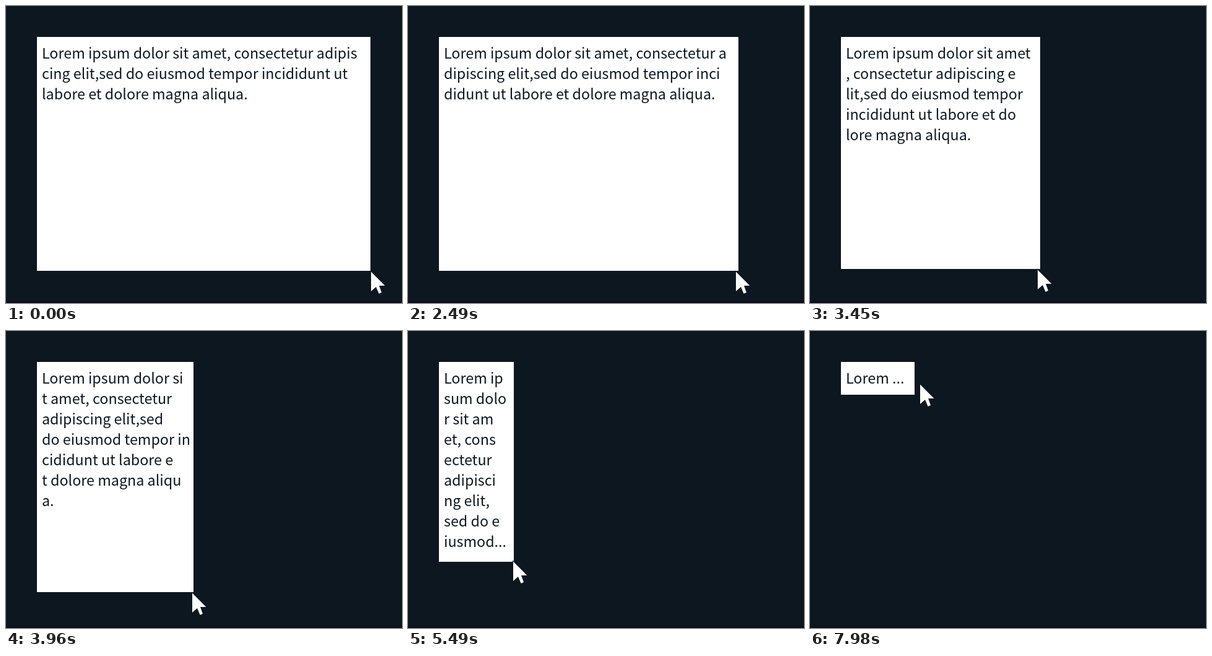
Write an HTML page that moves like this. It is 640 by 480 pixels and loops after 8000 ms.

```html
<!DOCTYPE html>
<html lang="en">
<head>
<meta charset="utf-8">
<title>Resizable text box</title>
<style>
  html, body { margin: 0; width: 100%; height: 100%; overflow: hidden; background: #0d1720; }
  svg { position: absolute; left: 0; top: 0; display: block; }
  text {
    font: 23.3px "Noto Sans CJK JP", "Noto Sans", sans-serif;
    fill: #0d1720; white-space: pre;
  }
</style>
</head>
<body>
<svg width="640" height="480" viewBox="0 0 640 480">
  <rect y="477" width="640" height="3" fill="#0d0e1b"/>
  <rect id="box" x="50" y="50" fill="#fff"/>
  <g id="lines"></g>
  <path id="cursor" d="M0 -.4L22.4 22H13L17 33L12.7 35L8 24L0 31Z"
    fill="#fff" stroke="#0d1720" stroke-width="2" paint-order="stroke"/>
</svg>
<script>
const LOOP = 8000, STEP = 30;
const LEFT = 50, TOP = 50, MIN = 53;
const CHAR = 11.2, LINE = 33;
const TEXT = "Lorem ipsum dolor sit amet, consectetur adipiscing elit,sed do " +
  "eiusmod tempor incididunt ut labore et dolore magna aliqua.";

// Key points of the pointer: time, x, y
const PATH = [
  [0, 590, 430], [2080, 590, 430], [2430, 540, 430], [2940, 448, 429],
  [3960, 301, 424], [4770, 228, 415], [5670, 161, 356], [6360, 144, 235],
  [7290, 101, 99], [7530, 84, 86], [7680, 84, 86], [7980, 178, 87], [8100, 200, 88]
];

const box = document.getElementById("box");
const lines = document.getElementById("lines");
const cursor = document.getElementById("cursor");
let shown = "";

function slope(i, k) {
  const a = PATH[i], b = PATH[i + 1];
  return a && b ? (b[k] - a[k]) / (b[0] - a[0]) : 0;
}

// Monotone tangent: harmonic mean of the neighbouring slopes
function tangent(i, k) {
  const a = slope(i - 1, k), b = slope(i, k);
  return a * b > 0 ? 2 * a * b / (a + b) : 0;
}

function pointer(t) {
  const i = PATH.findIndex(p => p[0] > t) - 1;
  const a = PATH[i], b = PATH[i + 1], d = b[0] - a[0];
  const u = (t - a[0]) / d, v = 1 - u;
  return [1, 2].map(k => Math.round(
    a[k] * (1 + 2 * u) * v * v + b[k] * u * u * (3 - 2 * u) +
    d * u * v * (tangent(i, k) * v - tangent(i + 1, k) * u)));
}

function wrap(w, h) {
  const cols = Math.max(Math.floor(w / CHAR) - 2, 2);
  const rows = Math.max(Math.floor((h - 20) / LINE), 1);
  const out = [];
  for (let i = 0; i < TEXT.length; i += cols) out.push(TEXT.slice(i, i + cols));
  if (out.length > rows) {
    out.length = rows;
    out[rows - 1] = out[rows - 1].slice(0, cols - 2) + "...";
  }
  return out;
}

function setLines(list) {
  const key = list.join("\n");
  if (key === shown) return;
  shown = key;
  lines.replaceChildren(...list.map((s, i) => {
    const el = document.createElementNS("http://www.w3.org/2000/svg", "text");
    el.setAttribute("x", LEFT + 8);
    el.setAttribute("y", TOP + 35 + i * LINE);
    el.textContent = s;
    return el;
  }));
}

function draw(time) {
  const t = Math.floor(time % LOOP / STEP) * STEP;
  const [x, y] = pointer(t);
  // The box follows the pointer one step late
  const [bx, by] = pointer(Math.max(t - STEP, 0));
  const w = Math.max(bx - 1 - LEFT, MIN), h = Math.max(by - 2 - TOP, MIN);
  box.setAttribute("width", w);
  box.setAttribute("height", h);
  setLines(wrap(w, h));
  cursor.setAttribute("transform", `translate(${x} ${y})`);
}

const start = performance.now();
function tick() {
  draw(Math.max(performance.now() - start, 0));
  requestAnimationFrame(tick);
}
draw(0);
requestAnimationFrame(tick);
</script>
</body>
</html>
```
